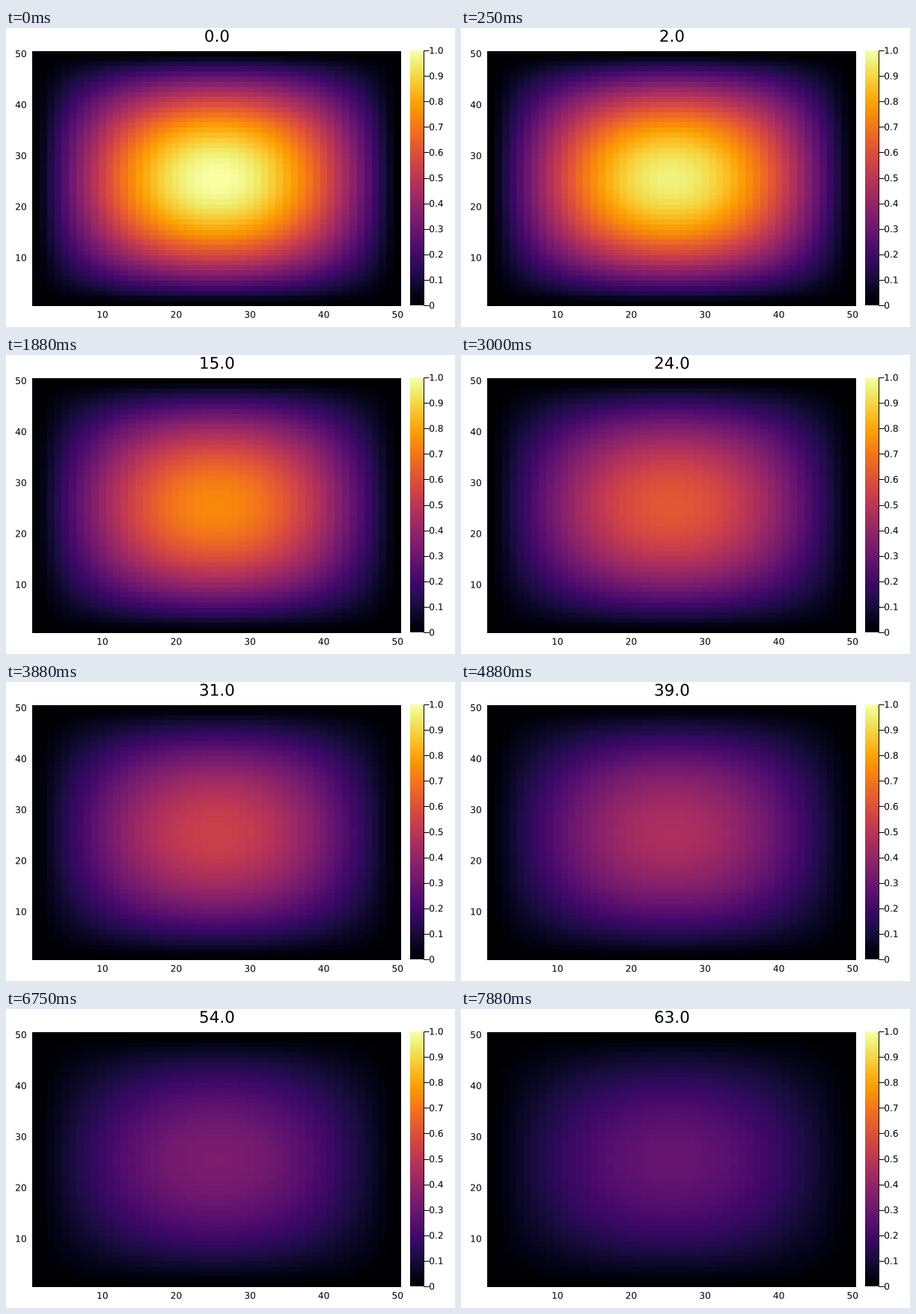
A matplotlib script for the animation above (8 s loop, 600 px wide and 400 px high).

```python
import numpy as np
import matplotlib.pyplot as plt
from matplotlib.animation import FuncAnimation
from matplotlib.patches import PathPatch
from matplotlib.textpath import TextPath

plt.rcParams["font.family"] = "DejaVu Sans"

W, H = 600, 400
FRAMES, INTERVAL = 64, 125
N = 50
DECAY = 2 * np.pi**2 * 0.001

# Pixel bounds, y pointing up
LEFT, RIGHT, BOTTOM, TOP = 35, 528, H - 372, H - 31
BAR_LEFT, BAR_RIGHT, BAR_BOTTOM, BAR_TOP = 540, 558, H - 371, H - 30
TICK_SIZE, TITLE_SIZE = 12.2, 21.5

fig = plt.figure(figsize=(W / 100, H / 100), dpi=100, facecolor="white")
ax = fig.add_axes([0, 0, 1, 1])
ax.axis("off")


def text_path(x, y, text, size, align):
    """Outline of text whose advance box is aligned at x (0 left, 1 right)."""
    advance = size * sum(0.318 if c == "." else 0.636 for c in text)
    return TextPath((x - align * advance, y - 0.365 * size), text, size=size)


def label(x, y, text, size=TICK_SIZE, align=0.5):
    patch = PathPatch(text_path(x, y, text, size, align), fc="black", lw=0, snap=False)
    return ax.add_patch(patch)


def line(xs, ys):
    ax.plot(xs, ys, color="black", lw=0.72, solid_capstyle="butt")


def image(data, extent):
    return ax.imshow(data, cmap="inferno", vmin=0, vmax=1, origin="lower",
                     extent=extent, interpolation="nearest", aspect="auto")


wave = np.sin(np.pi * np.linspace(0, 1, N))
start = np.outer(wave, wave)

heat = image(start, (LEFT, RIGHT, BOTTOM, TOP))
image(np.linspace(0, 1, 256)[:, None], (BAR_LEFT, BAR_RIGHT, BAR_BOTTOM, BAR_TOP))

for v in range(10, N + 1, 10):
    f = (v - 0.5) / N
    label(LEFT + 0.2 + f * (RIGHT - LEFT), H - 383.2, str(v))
    label(27.7, BOTTOM + f * (TOP - BOTTOM), str(v), align=1)

for i in range(11):
    y = BAR_BOTTOM + i / 10 * (BAR_TOP - BAR_BOTTOM)
    line([BAR_RIGHT, 565], [y, y])
    label(565.2, y, f"{i / 10:.1f}" if i else "0", align=0)

line([BAR_RIGHT, BAR_RIGHT], [BAR_BOTTOM, BAR_TOP])

TITLE_POS = (281.9, H - 10.5)
title = label(*TITLE_POS, "0.0", TITLE_SIZE)

ax.set_xlim(0, W)
ax.set_ylim(0, H)


def update(k):
    heat.set_data(start * np.exp(-DECAY * k))
    title.set_path(text_path(*TITLE_POS, f"{k:.1f}", TITLE_SIZE, 0.5))
    return heat, title


anim = FuncAnimation(fig, update, frames=FRAMES, interval=INTERVAL,
                     repeat=True, repeat_delay=0, blit=False)
plt.show()
```
